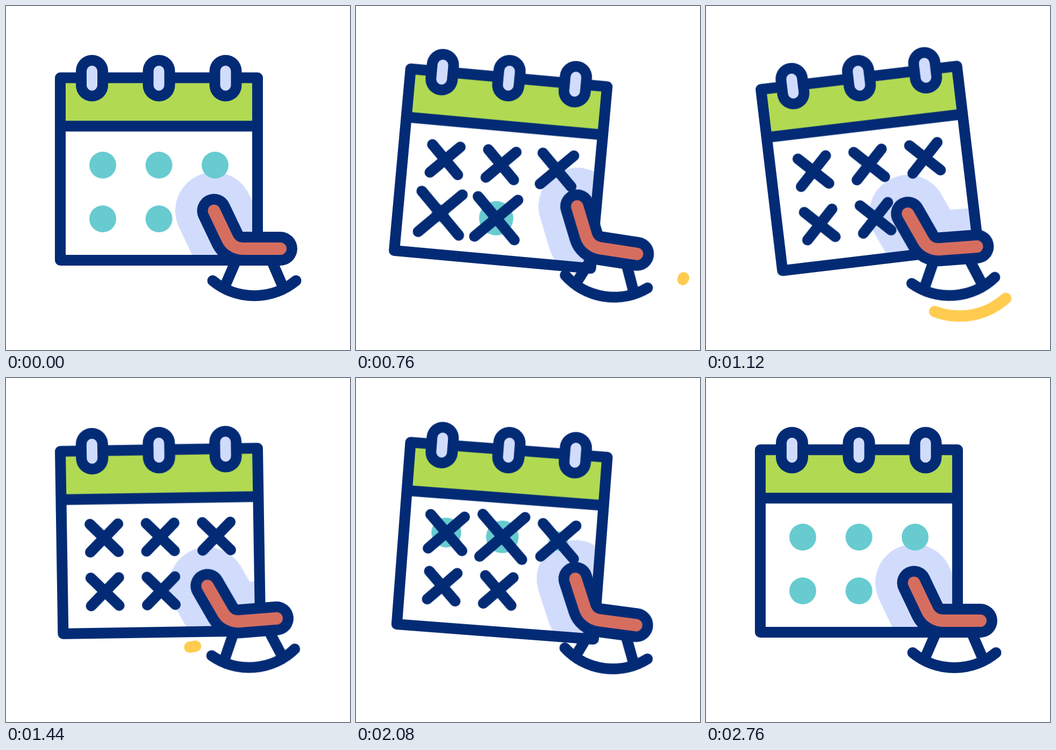
Recreate the animation shown at these times as an HTML page. Size 640 by 640 pixels, loop 3 s.

```html
<!DOCTYPE html>
<html lang="en">
<head>
<meta charset="utf-8">
<title>Retirement countdown</title>
<style>
  @property --head { syntax: "<number>"; inherits: false; initial-value: 0; }
  @property --tail { syntax: "<number>"; inherits: false; initial-value: 0; }

  :root {
    --navy: #032b75;
    --lilac: #d1dcfd;
    --ease: cubic-bezier(.3333, 0, .6667, 1);
  }
  html, body { margin: 0; width: 100%; height: 100%; overflow: hidden; background: #fff; }
  svg { display: block; width: 100vw; height: 100vh; }
  path, line { fill: none; stroke-linecap: round; stroke-linejoin: round; }

  .cal, .uncal, .chair, .dot, .cross { animation: 3s var(--ease) infinite both; }
  .cal, .uncal { transform-origin: 284.5px 134px; animation-name: swing; }
  .cal { --dir: 1; }
  .uncal { --dir: -1; }
  .chair { transform-origin: 453px 537px; animation-name: rock; }

  .dot, .cross { animation-delay: calc(40ms + var(--i) * 120ms); }
  .dot { fill: #67cbd0; animation-name: dot; }
  .cross { stroke: var(--navy); stroke-width: 20; vector-effect: non-scaling-stroke; animation-name: cross; }

  .line { stroke: var(--navy); stroke-width: 20; }
  .ring { stroke: var(--navy); stroke-width: 60; }
  .slot { stroke: var(--lilac); stroke-width: 20; }
  .shade { stroke: var(--lilac); stroke-width: 144; }
  .frame { stroke: var(--navy); stroke-width: 63; }
  .seat { stroke: #d66e60; stroke-width: 23; }
  .streak {
    stroke: #ffcc50;
    stroke-width: 21;
    stroke-dasharray: calc((var(--head) - var(--tail)) * 1px) 300px;
    stroke-dashoffset: calc(var(--tail) * -1px);
    animation: head 3s var(--ease) infinite, tail 3s var(--ease) infinite, show 3s step-end infinite;
  }

  @keyframes swing {
    0%, 4%, 78%, 100% { transform: rotate(0deg); }
    18.667%, 60% { transform: rotate(calc(var(--dir) * 9.25deg)); }
    39.333% { transform: rotate(calc(var(--dir) * -7.2deg)); }
  }
  @keyframes rock {
    0%, 4.667%, 89.333%, 100% { transform: rotate(0deg); }
    24%, 62.667% { transform: rotate(9deg); }
    42.667% { transform: rotate(-7.5deg); }
  }
  @keyframes dot {
    0%, 73.333%, 100% { transform: scale(1); }
    7.667% { transform: scale(1.28); }
    16.667%, 56.667% { transform: scale(0); }
    62.667% { transform: scale(1.22); }
  }
  @keyframes cross {
    0%, 74.333%, 100% { transform: scale(0); visibility: hidden; }
    9.667%, 65.333% { transform: scale(1.55); visibility: visible; }
    18.667%, 56.667% { transform: scale(1); visibility: visible; }
  }
  @keyframes head {
    0%, 24% { --head: 0; }
    45.867%, 100% { --head: 100; }
  }
  @keyframes tail {
    0%, 31.233% { --tail: 0; }
    50.067%, 100% { --tail: 100; }
  }
  @keyframes show {
    0%, 50.067%, 100% { visibility: hidden; }
    24.1% { visibility: visible; }
  }
</style>
</head>
<body>
<svg viewBox="0 0 640 640">
  <clipPath id="page"><rect x="101" y="223" width="367" height="250"/></clipPath>

  <g class="cal">
    <rect x="101" y="133.5" width="367" height="339.5" fill="#fff"/>
    <!-- the shade follows the chair but stays inside the page -->
    <g clip-path="url(#page)">
      <g class="uncal">
        <g class="chair">
          <path class="shade" d="M387 381L412 433.5A31.5 31.5 0 0 0 440.5 451.5H510.5"/>
        </g>
      </g>
    </g>
    <rect x="101" y="133.5" width="367" height="90" fill="#b1da52"/>
    <path class="line" d="M101 133.5H468V473H101ZM101 223.5H468"/>

    <path class="ring" d="M160 121V147.5M284.5 121V147.5M408.5 121V147.5"/>
    <path class="slot" d="M160 121V147.5M284.5 121V147.5M408.5 121V147.5"/>

    <g transform="translate(180 296)" style="--i:0">
      <circle class="dot" r="25"/><path class="cross" d="M-26-26L26 26M26-26L-26 26"/>
    </g>
    <g transform="translate(284.5 296)" style="--i:1">
      <circle class="dot" r="25"/><path class="cross" d="M-26-26L26 26M26-26L-26 26"/>
    </g>
    <g transform="translate(389 296)" style="--i:2">
      <circle class="dot" r="25"/><path class="cross" d="M-26-26L26 26M26-26L-26 26"/>
    </g>
    <g transform="translate(180 396)" style="--i:3">
      <circle class="dot" r="25"/><path class="cross" d="M-26-26L26 26M26-26L-26 26"/>
    </g>
    <g transform="translate(284.5 396)" style="--i:4">
      <circle class="dot" r="25"/><path class="cross" d="M-26-26L26 26M26-26L-26 26"/>
    </g>
  </g>

  <g class="chair">
    <path class="streak" pathLength="100" d="M603 482A129 129 0 0 1 356 491L345 492"/>
    <path class="line" d="M384.5 511A121 121 0 0 0 539.5 511M426 478L407 522M496 478L515 522"/>
    <path class="frame" d="M387 381L412 433.5A31.5 31.5 0 0 0 440.5 451.5H510.5"/>
    <path class="seat" d="M387 381L412 433.5A31.5 31.5 0 0 0 440.5 451.5H510.5"/>
  </g>
</svg>
</body>
</html>
```
